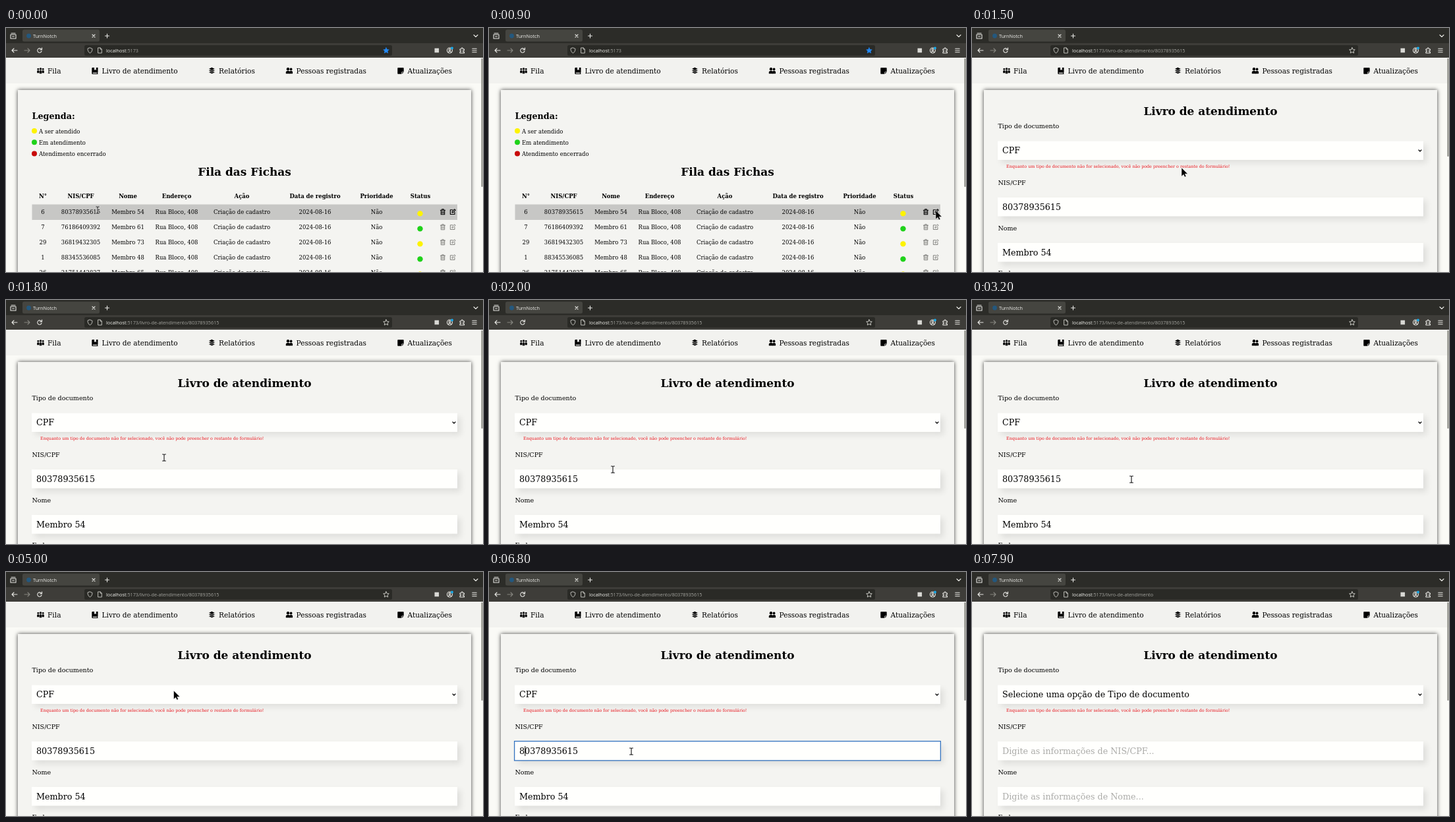
Animation, 724 px wide and 370 px high, one loop 8 s. Source, as an HTML page with a canvas:

```html
<!DOCTYPE html>
<html lang="pt-BR">
<head>
<meta charset="utf-8">
<title>Livro de atendimento</title>
<style>
html, body { margin: 0; width: 100%; height: 100%; overflow: hidden; background: #fafaf6; }
canvas { display: block; }
</style>
</head>
<body>
<canvas id="stage" width="724" height="370"></canvas>
<script>
const ctx = document.getElementById('stage').getContext('2d');
const SERIF = '"DejaVu Serif", serif', SANS = '"Open Sans", sans-serif';
const SCALE = 0.53; // page zoom
const YELLOW = '#fdf300', GREEN = '#1fd21a', RED = '#c80a0a';
const CPF = '80378935615';
const ROWS = [
  [6, CPF, 'Membro 54', YELLOW],
  [7, '76186409392', 'Membro 61', GREEN],
  [29, '36819432305', 'Membro 73', YELLOW],
  [1, '88345536085', 'Membro 48', GREEN],
  [26, '31751442837', 'Membro 65', YELLOW]
];
const COLUMNS = [56, 113.5, 185, 259, 358, 469, 562.5, 629];
// Pointer path: time, x, y
const PATH = [
  [0, 139, 276], [500, 420, 301], [900, 678, 277], [1100, 678, 277],
  [1500, 318, 212], [2000, 188, 257], [2400, 196, 275], [3200, 242, 272],
  [4800, 242, 272], [4900, 248, 228], [5000, 254.5, 180], [5300, 254.5, 180],
  [5400, 236, 243], [5500, 236, 243], [5600, 236, 247], [5700, 236, 247],
  [6100, 216, 272], [8000, 216, 272]
];

function text(str, x, y, size, { color = '#000', bold = false, align = 'left', family = SERIF } = {}) {
  ctx.font = `${bold ? 'bold ' : ''}${size}px ${family}`;
  ctx.fillStyle = color;
  ctx.textAlign = align;
  ctx.fillText(str, x, y);
  return ctx.measureText(str).width;
}
const pageText = (str, x, y, px, opts) => text(str, x, y, px * SCALE, opts);

function rect(x, y, w, h, color, radius = 0) {
  ctx.fillStyle = color;
  ctx.beginPath();
  ctx.roundRect(x, y, w, h, radius);
  ctx.fill();
}
function dot(x, y, r, color) {
  ctx.fillStyle = color;
  ctx.beginPath();
  ctx.arc(x, y, r, 0, 7);
  ctx.fill();
}
function shadow(color, blur, dx, dy, draw) {
  ctx.save();
  Object.assign(ctx, { shadowColor: color, shadowBlur: blur, shadowOffsetX: dx, shadowOffsetY: dy });
  draw();
  ctx.restore();
}
// Paths are centred on x, y
function icon(x, y, d, { fill, stroke, width = 1 }) {
  const path = new Path2D(d);
  ctx.save();
  ctx.translate(x, y);
  ctx.lineWidth = width;
  ctx.lineCap = ctx.lineJoin = 'round';
  if (fill) { ctx.fillStyle = fill; ctx.fill(path); }
  if (stroke) { ctx.strokeStyle = stroke; ctx.stroke(path); }
  ctx.restore();
}
function person(x, y, r, w, h) {
  dot(x, y, r, '#000');
  rect(x - w / 2, y + r + 0.6, w, h, '#000', [w / 2.5, w / 2.5, 0.5, 0.5]);
}

function browser(url, starred) {
  const line = { stroke: '#e8e8e4', width: 1.1 }, dim = { stroke: '#85857f', width: 1.1 };
  rect(0, 0, 724, 23, '#2c2c28');
  rect(0, 23, 724, 22, '#3e3d39');
  icon(11, 12, 'M-3-4H3M-4-2H4V4H-4ZM-1.5 1H1.5', line);
  rect(25, 2.5, 117, 18, '#454540', 2.5);
  dot(34.5, 12, 3.4, '#24587e');
  text('TurnNotch', 41, 14.5, 7.28, { color: '#f2f2ee', family: SANS });
  icon(133, 12, 'M-2-2L2 2M2-2L-2 2', line);
  icon(153.5, 12, 'M-3 0H3M0-3V3', line);
  icon(713, 12, 'M-3-1.5L0 1.5L3-1.5', line);

  icon(13, 34, 'M4 0H-4M-1-3L-4 0L-1 3', line);
  icon(32, 34, 'M-4 0H4M1-3L4 0L1 3', dim);
  icon(51, 34, 'M3 1A3.2 3.2 0 1 1 2.2-2.2L3.5-1M3.5-4V-1H.5', line);
  rect(119, 26, 467, 16, '#2a2a26', 2.5);
  icon(127.5, 34, 'M0-4L3.5-2.5C3.5 1 2 3 0 4C-2 3-3.5 1-3.5-2.5Z', { stroke: '#bdbdb8' });
  icon(142.5, 34, 'M-2.5-4H.7L2.8-1.8V4H-2.5ZM.7-4V-1.8H2.8', { stroke: '#bdbdb8' });
  const host = text('localhost', 152, 36.7, 7.28, { color: '#f4f4f0', family: SANS });
  text(':5173' + url, 152 + host, 36.7, 7.28, { color: '#a3a39e', family: SANS });
  icon(577, 34, 'M0-4.2L1.3-1.4L4.3-1.1L2.1 1L2.7 4L0 2.5L-2.7 4L-2.1 1L-4.3-1.1L-1.3-1.4Z',
    starred ? { fill: '#2389f5', stroke: '#2389f5', width: 0.6 } : { stroke: '#d6d6d1', width: 0.9 });

  rect(650.5, 30.7, 6.6, 6.6, '#d8d8d4');
  icon(673.5, 34, 'M4 0A4 4 0 1 1-4 0A4 4 0 1 1 4 0M1.4-1A1.4 1.4 0 1 1-1.4-1A1.4 1.4 0 1 1 1.4-1M-2.6 2.7Q0 .3 2.6 2.7', line);
  dot(677, 30.5, 2, '#19a9e8');
  icon(692.5, 34, 'M-3.5-2H-1.5C-2-4.6 1.4-4.6 1-2H3V0C.4-.4.4 2.6 3 2.2V4H-3.5V2C-1.4 2.2-1.4-.4-3.5 0Z', line);
  icon(711, 34, 'M-3.2-2.7H3.2M-3.2 0H3.2M-3.2 2.7H3.2', line);
}

function nav() {
  const black = { fill: '#000' };
  rect(0, 45, 724, 39, '#f2f2ef');
  for (const dx of [-3.7, 3.7]) person(52.5 + dx, 62.3, 1.4, 3.2, 4);
  person(52.5, 62, 1.7, 3.4, 5);
  icon(135, 65, 'M-3.5-5H4.5V2.8H4V4H4.5V5H-3.5Q-4.7 5-4.7 3.7V-3.7Q-4.7-5-3.5-5ZM-3.2 2.8V4H3V2.8ZM-1-5V-1L.4-2L1.8-1V-5Z',
    { fill: '#000' });
  icon(135.4, 62.4, 'M-1.4-2.4V1L0 0L1.4 1V-2.4Z', { fill: '#f2f2ef' });
  for (const y of [67.2, 64.6, 62]) {
    icon(312.5, y, 'M0-2.4L5 0L0 2.4L-5 0Z', { fill: '#000', stroke: '#f2f2ef', width: 0.7 });
  }
  person(432.6, 62.5, 1.9, 5, 4.2);
  person(428, 62.2, 2.2, 6.4, 4.2);
  icon(599, 65, 'M-4-4.7H4Q4.7-4.7 4.7-4V1.4H2Q1.4 1.4 1.4 2V4.7H-4Q-4.7 4.7-4.7 4V-4Q-4.7-4.7-4-4.7ZM4.6 2.2L2.2 4.6V2.2Z', black);
  [['Fila', 63], ['Livro de atendimento', 145.5], ['Relatórios', 323],
    ['Pessoas registradas', 440.5], ['Atualizações', 609.5]]
    .forEach(([label, x]) => pageText(label, x, 68.6, 20));
}

function card() {
  shadow('rgba(0,0,0,.75)', 6, 0, 0, () => rect(18, 94, 688, 300, '#f4f4f1'));
}

function queue(pointer) {
  pageText('Legenda:', 39.5, 137.8, 24, { bold: true });
  [['A ser atendido', YELLOW], ['Em atendimento', GREEN], ['Atendimento encerrado', RED]]
    .forEach(([label, color], i) => {
      dot(43, 156 + i * 17.2, 4, color);
      pageText(label, 50, 159.6 + i * 17.2, 16);
    });
  pageText('Fila das Fichas', 362, 224, 32, { bold: true, align: 'center' });
  ['N°', 'NIS/CPF', 'Nome', 'Endereço', 'Ação', 'Data de registro', 'Prioridade', 'Status']
    .forEach((label, i) => pageText(label, COLUMNS[i], 257.6, 16, { bold: true, align: 'center' }));

  ROWS.forEach(([id, cpf, name, color], i) => {
    const y = 282 + i * 23, top = y - 14.5;
    const hover = pointer.y >= top && pointer.y < top + 23;
    if (hover) rect(39.5, top, 645.5, 23.5, '#c7c7c5');
    [id, cpf, name, 'Rua Bloco, 408', 'Criação de cadastro', '2024-08-16', 'Não']
      .forEach((cell, c) => pageText(cell, COLUMNS[c], y, 16, { align: 'center' }));
    dot(628.5, y - 0.6, 4.2, color);
    const ink = { stroke: hover ? '#000' : '#777773', width: hover ? 1.1 : 0.9 };
    icon(663, y - 3.2, 'M-3.6-2.6H3.6M-1.3-2.6V-4H1.3V-2.6M-2.7-2.6V4H2.7V-2.6M-1-.7V2.3M1-.7V2.3', ink);
    icon(678, y - 3.2, 'M0-3H-3.6V3.7H3V.5M-1 1.2L-.7-.7L2.8-4L4.2-2.6L.8.8Z', ink);
  });
}

function field(label, y, value, placeholder) {
  pageText(label, 39.5, y - 19.3, 18);
  shadow('rgba(0,0,0,.09)', 9, 5, 5, () => rect(39, y, 646, 28.5, '#fffffd'));
  pageText(value || placeholder, 46, y + 18.8, 24, { color: value ? '#000' : '#ababa8' });
}

function form(empty, focused, caretX) {
  pageText('Livro de atendimento', 362, 131.6, 32, { bold: true, align: 'center' });
  field('Tipo de documento', 171.5, empty ? 'Selecione uma opção de Tipo de documento' : 'CPF');
  icon(680, 186, 'M-2-1L0 1L2-1', { stroke: '#000', width: 1.2 });
  pageText('Enquanto um tipo de documento não for selecionado, você não pode preencher o restante do formulário!',
    52, 212, 12, { color: '#e8141c' });
  field('NIS/CPF', 257, empty ? '' : CPF, 'Digite as informações de NIS/CPF...');
  field('Nome', 326, empty ? '' : 'Membro 54', 'Digite as informações de Nome...');
  pageText('Endereço', 39.5, 375.3, 18);
  if (focused) {
    ctx.strokeStyle = '#3473c0';
    ctx.lineWidth = 1.3;
    ctx.strokeRect(38.6, 256.6, 646.8, 29.3);
    rect(caretX, 264, 1, 15, '#000');
  }
}

function pointerAt(t) {
  const i = PATH.findIndex(p => p[0] > t);
  const [t0, x0, y0] = PATH[i - 1], [t1, x1, y1] = PATH[i];
  const k = (t - t0) / (t1 - t0);
  return { x: x0 + (x1 - x0) * k, y: y0 + (y1 - y0) * k };
}

function drawPointer({ x, y }, beam) {
  if (beam) {
    const d = 'M-2.5-5H-1Q0-5 0-4Q0-5 1-5H2.5M0-4V4M-2.5 5H-1Q0 5 0 4Q0 5 1 5H2.5';
    icon(x, y, d, { stroke: '#fff', width: 2 });
    icon(x, y, d, { stroke: '#111', width: 1.1 });
  } else {
    icon(x, y, 'M0 0V13L3 10.2L5 14L7 13L5.2 9.2H9.3Z', { fill: '#000', stroke: '#fff', width: 0.5 });
  }
}

function draw(t) {
  const between = (a, b) => t >= a && t < b;
  const onQueue = t < 1100;
  const empty = between(3700, 3900) || t >= 7100;
  const focused = between(3400, 3700) || between(6100, 7100);
  const caretX = t < 3700 ? 134.5 : t < 6800 ? 45.5 : 54.3;
  const hidden = between(3700, 4500) || t >= 7100; // typing hides the pointer
  const pointer = pointerAt(t);

  rect(0, 0, 724, 370, '#fafaf6');
  card();
  nav();
  if (onQueue) queue(pointer);
  else form(empty, focused, caretX);
  rect(721.5, 46, 2, onQueue ? 195 : 149, '#85857f', 1);
  browser(onQueue ? '' : '/livro-de-atendimento' + (empty ? '' : '/' + CPF), onQueue);
  if (!hidden) drawPointer(pointer, onQueue ? pointer.x < 145 : pointer.y > 236 && pointer.x < 600);
}

function loop(now) {
  draw(Math.floor(now % 8000 / 100) * 100);
  requestAnimationFrame(loop);
}
requestAnimationFrame(loop);
</script>
</body>
</html>
```
